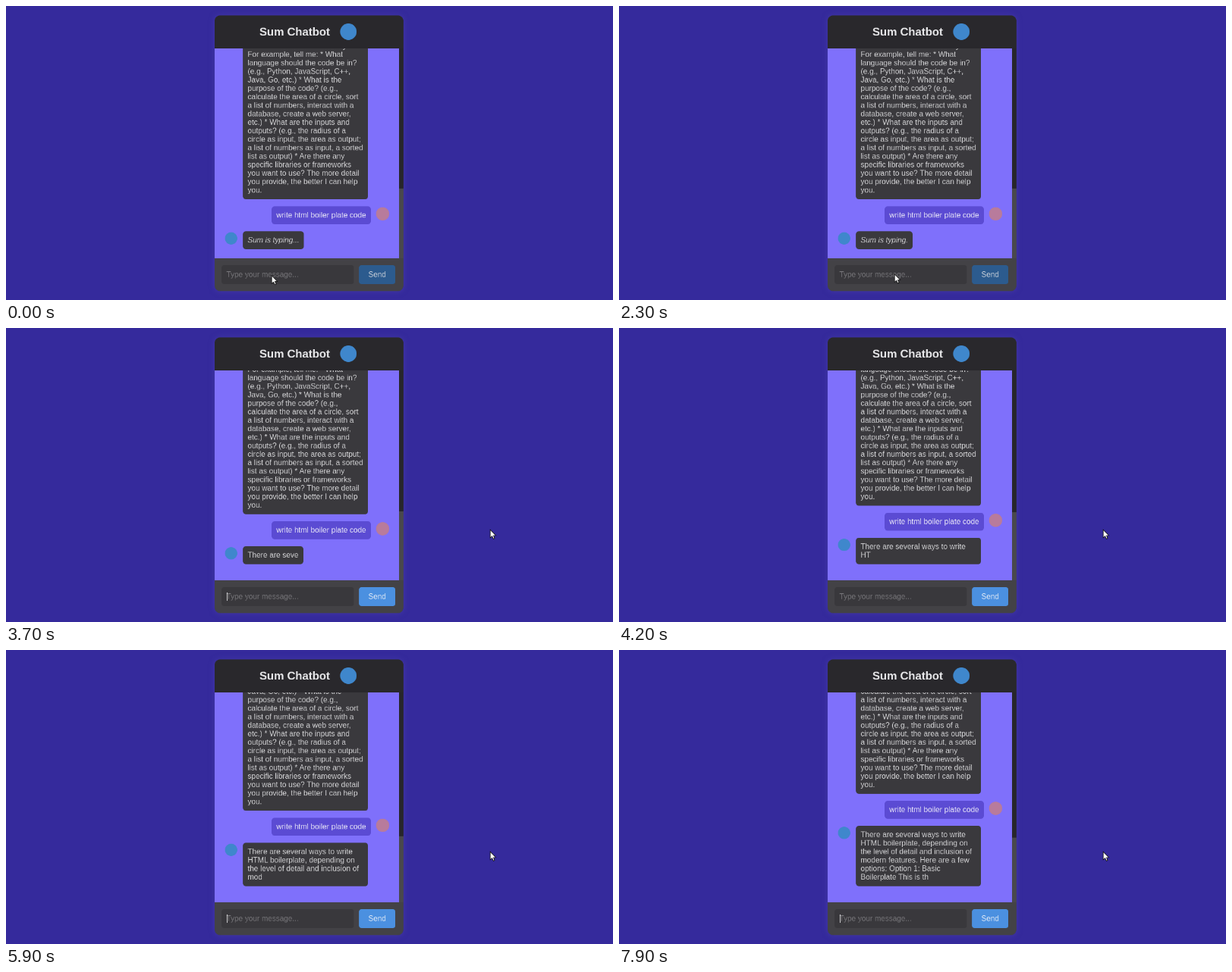
Animation of 800x388 px, one loop 8 s. Source, as an HTML page:

```html
<!DOCTYPE html>
<html lang="en">
<head>
<meta charset="utf-8">
<title>Chatbot</title>
<style>
html, body { margin: 0; width: 100%; height: 100%; overflow: hidden; background: #352a9c; }
/* will-change rasters the page at full size before it is scaled down, which keeps the letter shapes */
#stage { position: absolute; width: 1288px; height: 626px; transform: scale(.622); transform-origin: 0 0;
  will-change: transform; background: #352a9c;
  font: 16px/18px "Liberation Sans", Arial, sans-serif; color: #d2d2d4; }
#stage div, #cursor { position: absolute; box-sizing: border-box; }
#app, #glow { left: 442px; top: 20px; width: 400px; height: 585px; border-radius: 12px; }
#app { overflow: hidden; background: #434246; }
#glow { box-shadow: 0 0 14px rgba(90, 80, 185, .4); }
#head { width: 400px; height: 70px; background: #29282c; }
#head b { position: absolute; left: 95px; top: 21px; font-size: 24px; line-height: 28px; color: #e8e8ea; white-space: pre; }
#head i { position: absolute; left: 266px; top: 17px; width: 35px; height: 35px; border-radius: 50%; background: #3f87cc; }
#chat { top: 70px; width: 400px; height: 445px; overflow: hidden; background: #7f70fb; }
#log { bottom: 0; width: 391px; padding: 872px 20px 19px; }
#log .row { position: static; display: flex; align-items: flex-start; margin-bottom: 15px; }
#log .user { justify-content: flex-end; }
#log .typing { margin-bottom: 0; font-style: italic; }
.row p { margin: 0; padding: 10px; max-width: 245px; border-radius: 6px; background: #3a393d; white-space: pre-wrap; }
#old { width: 245px; white-space: pre; }
.user p { background: #5b4bd3; color: #eae8f8; }
.row i { flex: none; width: 26px; height: 26px; margin: 2px 12px 2px 2px; border-radius: 50%; background: #3f87cc; }
.user i { width: 28px; height: 28px; margin: 2px 1px 0 11px; background: #b87b9c; }
#track { right: 0; width: 9px; height: 445px; background: #27262b; }
#thumb { bottom: 0; width: 9px; background: #49484d; }
#field { left: 15px; top: 530px; width: 280px; height: 40px; padding: 11px 10px; border-radius: 5px; background: #39383c; color: #77767a; }
#caret { left: 11px; top: 11px; width: 1px; height: 18px; background: #e0e0e2; }
#send { left: 306px; top: 530px; width: 77px; height: 40px; line-height: 40px; border-radius: 5px; text-align: center; }
</style>
</head>
<body>
<div id="stage">
  <div id="glow"></div>
  <div id="app">
    <div id="head"><b>Sum Chatbot</b><i></i></div>
    <div id="chat">
      <div id="log">
        <div class="row" style="padding-left:40px"><p id="old">information to write code for you.
For example, tell me: * What
language should the code be in?
(e.g., Python, JavaScript, C++,
Java, Go, etc.) * What is the
purpose of the code? (e.g.,
calculate the area of a circle, sort
a list of numbers, interact with a
database, create a web server,
etc.) * What are the inputs and
outputs? (e.g., the radius of a
circle as input, the area as output;
a list of numbers as input, a sorted
list as output) * Are there any
specific libraries or frameworks
you want to use? The more detail
you provide, the better I can help
you.</p></div>
        <div class="row user"><p>write html boiler plate code</p><i></i></div>
        <div class="row" id="bot"><i></i><p id="reply"></p></div>
      </div>
      <div id="track"><div id="thumb"></div></div>
    </div>
    <div id="field">Type your message...<div id="caret"></div></div>
    <div id="send">Send</div>
  </div>
  <svg id="cursor" width="16" height="24" viewBox="-1 -1 16 24" overflow="visible">
    <path d="M0 0V17L4 13.4L6.6 19.4L9.4 18.2L6.8 12.3H12Z" fill="#fff" stroke="#111" stroke-width="1.2"/>
  </svg>
</div>
<script>
const $ = id => document.getElementById(id);
const SCALE = .622, LOOP = 8000, REPLY_AT = 3350, BLINK = 530, VIEW = 445;
const answer = "There are several ways to write HTML boilerplate, depending on the level of detail " +
  "and inclusion of modern features. Here are a few options: Option 1: Basic Boilerplate This is the";

// time, then values
const typed = [[REPLY_AT, 0], [4200, 34], [5900, 103], [7000, 146], [7900, 179]];
const pointer = [[1200, 350, 356], [1300, 351, 357], [1700, 351, 357], [2300, 363, 354],
  [2700, 375, 349], [3300, 481, 292], [3700, 638, 266]];

function at(keys, t, col = 1) {
  const i = keys.findIndex(k => k[0] > t);
  if (i === 0) return keys[0][col];
  if (i < 0) return keys[keys.length - 1][col];
  const a = keys[i - 1], b = keys[i];
  return a[col] + (b[col] - a[col]) * (t - a[0]) / (b[0] - a[0]);
}

function draw() {
  const t = Math.floor(performance.now() % LOOP / 100) * 100;
  const replying = t >= REPLY_AT;
  const dots = t < 800 ? 3 : Math.floor((t - 800) / 400) % 3 + 1;

  $("bot").className = replying ? "row" : "row typing";
  $("reply").textContent = replying
    ? answer.slice(0, Math.round(at(typed, t)))
    : "Sum is typing" + ".".repeat(dots);
  $("thumb").style.height = VIEW * VIEW / $("log").offsetHeight + "px";

  $("send").style.background = replying ? "#4b90e0" : "#2c5b8e";
  $("send").style.color = replying ? "#e0eaf6" : "#c8d0da";
  $("caret").hidden = !replying || Math.floor((t - REPLY_AT) / BLINK) % 2 === 1;

  const x = at(pointer, t) / SCALE - 1, y = at(pointer, t, 2) / SCALE - 1;
  $("cursor").style.left = x + "px";
  $("cursor").style.top = y + "px";
  requestAnimationFrame(draw);
}
draw();
</script>
</body>
</html>
```
